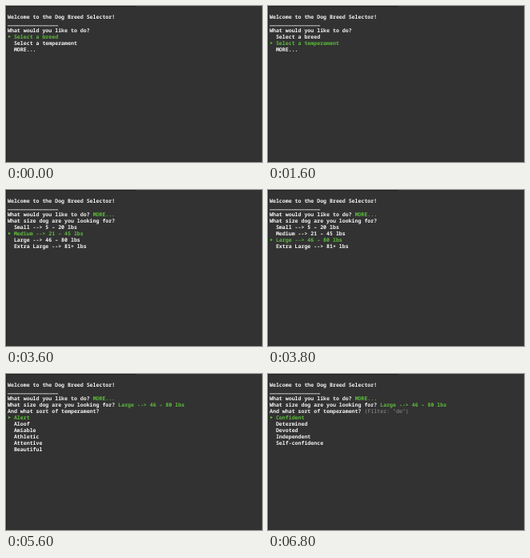
An HTML page that plays this animation: 320x196 px, repeating every 8 s.

```html
<!DOCTYPE html>
<html lang="en">
<head>
<meta charset="utf-8">
<title>Dog Breed Selector</title>
<style>
  html, body { margin: 0; height: 100%; overflow: hidden; background: #323232; }
  svg { display: block; width: 100vw; height: 100vh; }
  text {
    font: 600 6.58px "Noto Sans Mono", "DejaVu Sans Mono", monospace;
    text-rendering: geometricPrecision;
    white-space: pre;
    fill: #f4f4f4;
  }
  .green { fill: #5dbb3d; }
  .hint { fill: #929292; font-weight: 400; }
  .scene { visibility: hidden; }
  .scene.on { visibility: visible; }
</style>
</head>
<body>
<svg id="stage" viewBox="0 0 320 196" preserveAspectRatio="none">
  <rect width="320" height="196" fill="#323232"/>
  <path d="M0 .5H163" stroke="#1c1c1c"/>
  <path d="M.5 0V196" stroke="#242424"/>
</svg>
<script>
const NS = 'http://www.w3.org/2000/svg';
const LOOP = 8000, LEFT = 2, BASE = 16.3, CELL = 3.95, LINE = 8.1;
const stage = document.getElementById('stage');

function add(parent, tag, attrs, content = '') {
  const el = document.createElementNS(NS, tag);
  for (const key in attrs) el.setAttribute(key, attrs[key]);
  el.textContent = content;
  return parent.appendChild(el);
}

function write(parent, row, col, content, cls = '') {
  add(parent, 'text', { x: LEFT + col * CELL, y: BASE + row * LINE, class: cls }, content);
}

function ask(parent, row, question, reply = '', cls = 'green') {
  write(parent, row, 0, question);
  write(parent, row, question.length + 1, reply, cls);
}

function menu(parent, row, items, active) {
  items.forEach((item, i) => write(parent, row + i, 2, item, i === active ? 'green' : ''));
  const y = BASE + (row + active) * LINE - 2.2;
  add(parent, 'path', { d: `M3 ${y - 1.6}l3 1.6l-3 1.6z`, class: 'green' });
}

const TASK = 'What would you like to do?';
const SIZE = 'What size dog are you looking for?';
const MOOD = 'And what sort of temperament?';
const tasks = ['Select a breed', 'Select a temperament', 'MORE...'];
const sizes = ['Small --> 5 – 20 lbs', 'Medium --> 21 – 45 lbs', 'Large --> 46 – 80 lbs', 'Extra Large --> 81+ lbs'];

const pickTask = active => g => {
  ask(g, 2, TASK);
  menu(g, 3, tasks, active);
};

const pickSize = (active, hint) => g => {
  ask(g, 2, TASK, tasks[2]);
  ask(g, 3, SIZE, hint, 'hint');
  menu(g, 4, sizes, active);
};

const pickMood = (items, hint, more) => g => {
  ask(g, 2, TASK, tasks[2]);
  ask(g, 3, SIZE, sizes[2]);
  ask(g, 4, MOOD, hint, 'hint');
  if (more) write(g, 5, 0, more, 'hint');
  menu(g, more ? 6 : 5, items.split(' '), 0);
};

const scenes = [
  [0, pickTask(0)],
  [1300, pickTask(1)],
  [1700, pickTask(2)],
  [2400, pickSize(0, '(Use ↑/↓ arrow keys, press Enter to select)')],
  [3600, pickSize(1)],
  [3800, pickSize(2)],
  [4600, pickMood('Active Adaptable Adventurous Affectionate Aggressive Agile',
    '(Use ↑/↓ and ←/→ arrow keys, press Enter to select', ', and letter keys to filter)')],
  [5600, pickMood('Alert Aloof Amiable Athletic Attentive Beautiful')],
  [5900, pickMood('Benevolent Boisterous Bold Bossy Brave Bright')],
  [6600, pickMood('Adaptable Adventurous Bold Confident Determined Devoted', '(Filter: "d")')],
  [6800, pickMood('Confident Determined Devoted Independent Self-confidence', '(Filter: "de")')]
].map(([start, draw]) => {
  const group = add(stage, 'g', { class: 'scene' });
  draw(group);
  return { start, group };
});

write(stage, 0, 0, 'Welcome to the Dog Breed Selector!');
write(stage, 0.9, 0, '_'.repeat(16));

const origin = performance.now();
let shown;

function tick() {
  const time = (performance.now() - origin) % LOOP;
  const scene = scenes.findLast(s => s.start <= time) || scenes[0];
  if (scene !== shown) {
    if (shown) shown.group.classList.remove('on');
    scene.group.classList.add('on');
    shown = scene;
  }
  requestAnimationFrame(tick);
}
tick();
</script>
</body>
</html>
```
